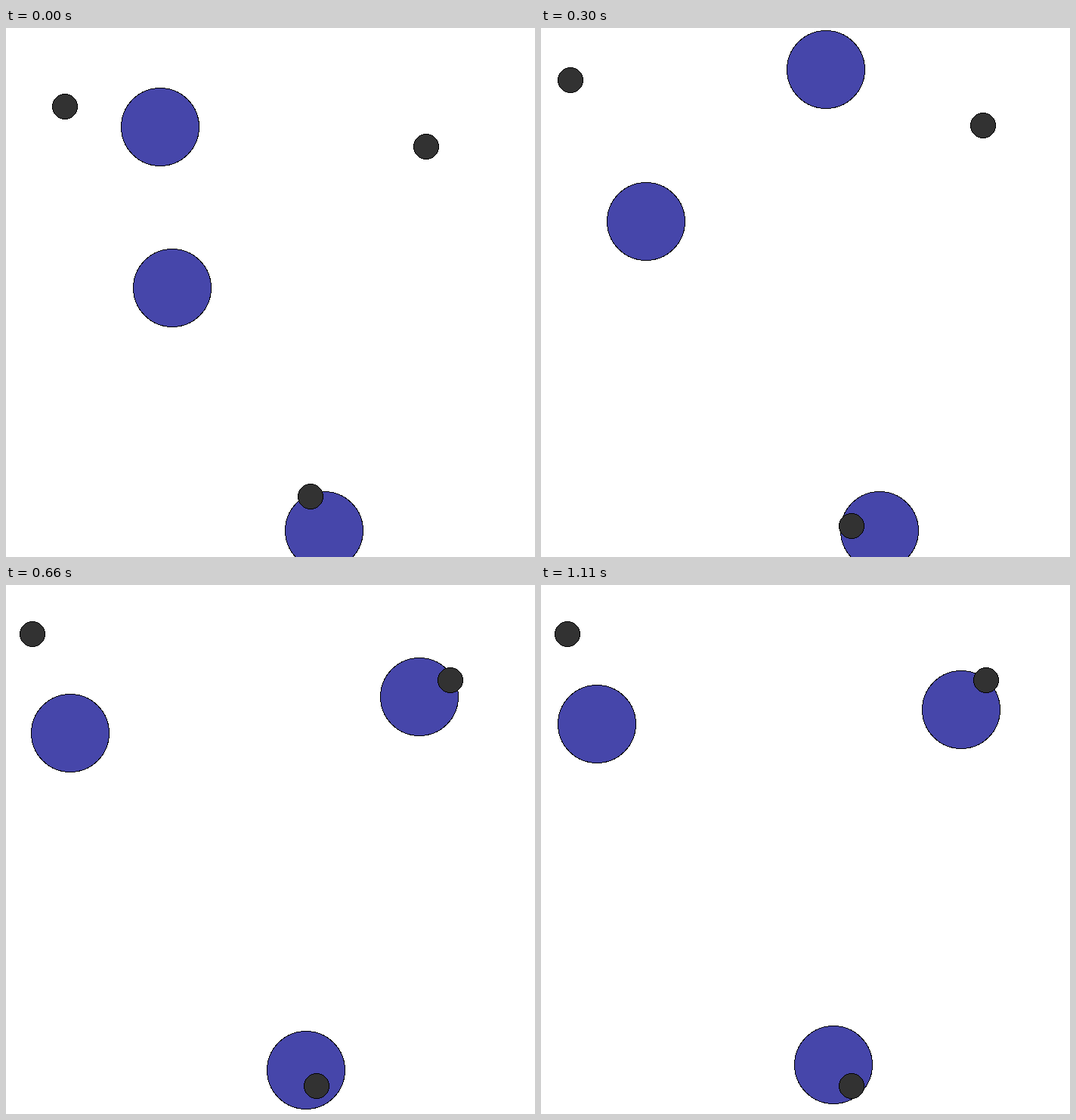
An HTML page that plays this animation: 700x700 px, repeating every 1.17 s.

```html
<!DOCTYPE html>
<html>
<head>
<meta charset="utf-8">
<style>
  html, body { margin: 0; width: 100%; height: 100%; overflow: hidden; background: #fff; }
  svg { display: block; }
  circle { stroke: #000; shape-rendering: crispEdges; }
</style>
</head>
<body>
<svg id="stage" width="700" height="700"></svg>
<script>
const LOOP = 1170;
const FLOOR = 665;

// Share of the way still to go: 1 at step 0, falling to 0; a small pull starts off slowly
const left = (step, pull) => 1 / (1 + pull * (1.3 ** step - 1));
const glide = (from, to, pull) => step =>
  from.map((start, axis) => to[axis] + (start - to[axis]) * left(step, pull));

// The swooping ball: a Catmull-Rom curve, four steps per point, the first point only sets the lead-in
const bends = [[568, 401], [204, 131], [280, 55], [472, 73], [530, 141], [556, 150], [549, 168], [556, 165]];

function swoop(step) {
  const at = Math.max(step - 1, 0) / 4;
  const i = Math.floor(at), u = at - i;
  const point = n => bends[Math.min(n, bends.length - 1)];
  return [0, 1].map(axis => {
    const [a, b, c, d] = [0, 1, 2, 3].map(n => point(i + n)[axis]);
    return b + u / 2 * (c - a + u * (2 * a - 5 * b + 4 * c - d + u * (3 * (b - c) + d - a)));
  });
}

// The low ball rolls right along the floor before it turns back
function roll(step) {
  const rest = left(step, 0.23);
  return [386.5 + Math.min(35 + 14.6 * step, 138) * rest, Math.min(FLOOR, 634.5 + 100 * rest)];
}

function circle(radius, fill, path) {
  const el = document.createElementNS('http://www.w3.org/2000/svg', 'circle');
  el.setAttribute('r', radius);
  el.setAttribute('fill', fill);
  document.getElementById('stage').append(el);
  return step => {
    const [x, y] = path(step);
    el.setAttribute('cx', Math.floor(x));
    el.setAttribute('cy', Math.floor(y));
  };
}
const ball = path => circle(51.5, '#4646aa', path);
const dot = (from, to) => circle(16.5, '#323232', glide(from, to, 1.62));

const movers = [
  ball(swoop),
  ball(glide([220, 344], [73.5, 183.5], 0.23)),
  ball(roll),
  dot([78, 104], [35, 65]),
  dot([556, 157.9], [589.3, 126.3]),
  dot([403, 620], [412, 664])
];

const start = performance.now();

function draw() {
  const t = (performance.now() - start) % LOOP;
  // Steps alternate between 30 and 60 ms; the first pose is held
  const tick = 2 * Math.floor(t / 90) + (t % 90 >= 30 ? 1 : 0);
  const step = tick < 2 ? 0 : tick;
  movers.forEach(move => move(step));
  requestAnimationFrame(draw);
}
draw();
</script>
</body>
</html>
```
